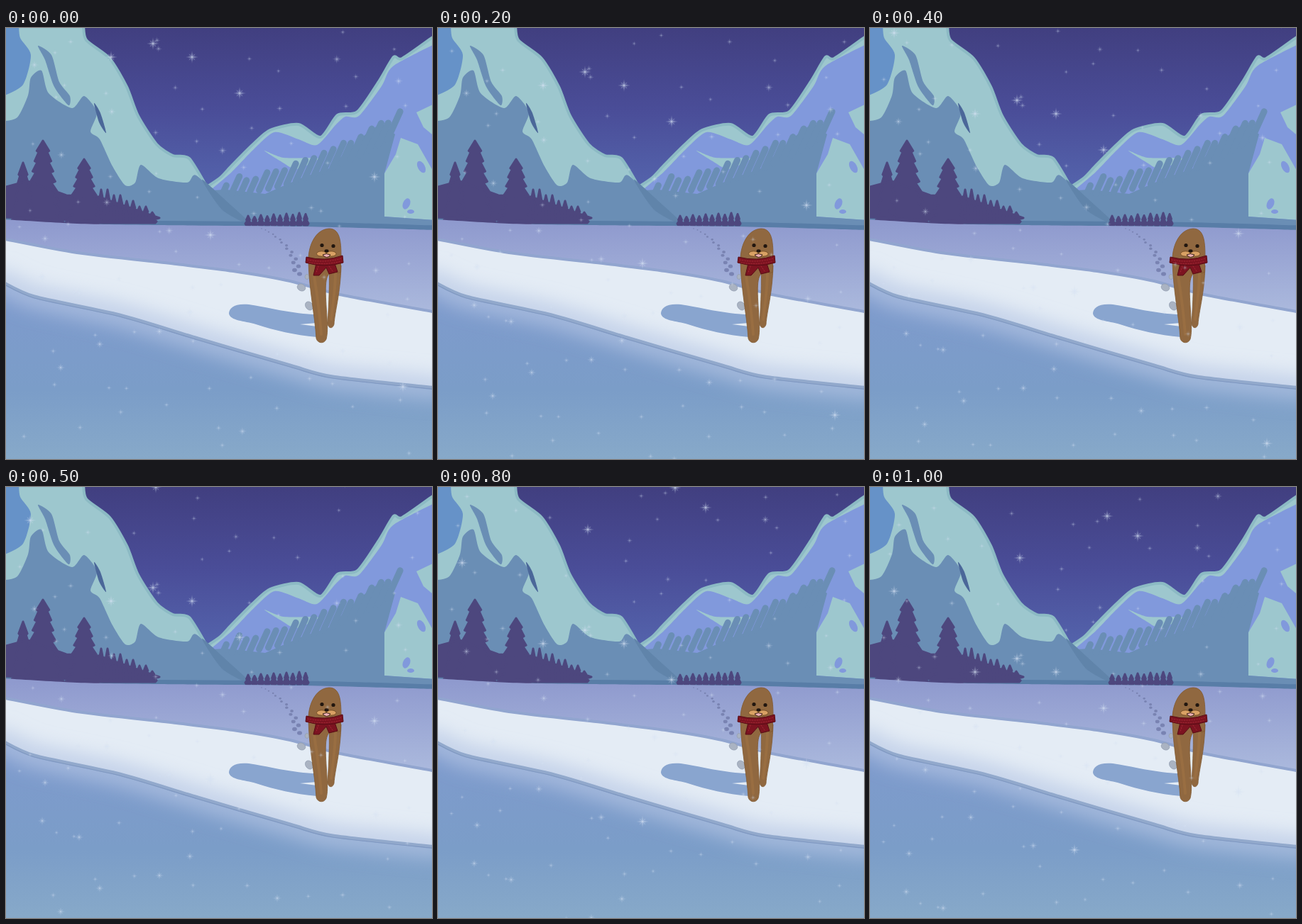
Write an HTML page that moves like this. It is 600 px wide and 608 px high and loops after 1100 ms.

```html
<!DOCTYPE html>
<html lang="en">
<head>
<meta charset="utf-8">
<title>Snowy valley</title>
<style>
html, body { margin: 0; width: 100%; height: 100%; overflow: hidden; background: #7e9fca; }
svg { display: block; width: 600px; height: 608px; }
.teal { fill: #9dc7ce; }
.ridge { stroke: #8cbac4; stroke-width: 4; }
.peri { fill: #8199dc; }
.shade { fill: #6a8eb5; }
.line { fill: none; stroke-linecap: round; stroke-linejoin: round; }
.tree { fill: #4d477e; stroke: #4d477e; stroke-width: 3; stroke-linejoin: round; }
.fur { fill: #906840; stroke: #80592f; stroke-width: .8; }
.scarf { fill: #7c1320; stroke: #570c16; stroke-width: 1; }
#snow { animation: fall 1100ms infinite; }
/* 20px per step, with one double step at 500 ms */
@keyframes fall {
  0% { transform: translateY(0); animation-timing-function: steps(5); }
  45.44% { transform: translateY(100px); animation-timing-function: step-start; }
  45.45% { transform: translateY(120px); animation-timing-function: steps(6); }
  100% { transform: translateY(240px); }
}
</style>
</head>
<body>
<svg viewBox="0 0 600 608">
  <defs>
    <linearGradient id="sky" x2="0" y2="1">
      <stop stop-color="#413f80"/><stop offset=".4" stop-color="#4a4d98"/><stop offset=".85" stop-color="#5668b0"/>
    </linearGradient>
    <linearGradient id="plain" gradientUnits="userSpaceOnUse" x1="0" y1="275" x2="0" y2="400">
      <stop stop-color="#8f9ace"/><stop offset="1" stop-color="#abb9dd"/>
    </linearGradient>
    <linearGradient id="front" gradientUnits="userSpaceOnUse" x1="0" y1="365" x2="0" y2="608">
      <stop stop-color="#7e9acd"/><stop offset=".6" stop-color="#7b9dc8"/><stop offset="1" stop-color="#87a9c9"/>
    </linearGradient>
    <filter id="blur" x="-20%" y="-50%" width="140%" height="200%"><feGaussianBlur stdDeviation="13"/></filter>
    <radialGradient id="glow">
      <stop stop-color="#e4ecf8" stop-opacity=".6"/><stop offset=".35" stop-color="#d2dff2" stop-opacity=".2"/>
      <stop offset="1" stop-color="#d2dff2" stop-opacity="0"/>
    </radialGradient>
    <g id="star">
      <circle r="6" fill="url(#glow)"/>
      <path fill="#d5e0f2" fill-opacity=".55" d="M0-9 .7-.7 9 0 .7 .7 0 9-.7 .7-9 0-.7-.7Z"/>
      <path class="line" stroke="#d5e0f2" stroke-opacity=".4" stroke-width=".7" d="M-4-4 4 4M4-4-4 4"/>
    </g>
  </defs>

  <rect width="600" height="290" fill="url(#sky)"/>

  <!-- right mountains -->
  <path class="teal ridge" data-end="V290H283Z" data-pts="283,224 302,211 319,193 348,164 372,144 412,136 443,154 467,123 495,118 526,74 546,41 558,43 605,10"/>
  <path class="peri" data-end="V290H290Z" data-pts="290,227 318,203 349,171 378,147 412,157 438,165 464,137 478,125 497,124 529,82 545,54 605,22"/>
  <path class="teal" data-pts="364,173 391,183 440,184 409,199 387,188"/>
  <path class="teal" d="M605 106 578 119 588 140 605 154ZM533 205 549 178 556 155 580 164 605 208V271L533 266Z"/>
  <g class="peri">
    <ellipse cx="585" cy="196" rx="5" ry="9" transform="rotate(-28 585 196)"/>
    <ellipse cx="564" cy="248" rx="5" ry="8" transform="rotate(22 564 248)"/>
    <ellipse cx="570" cy="259" rx="5" ry="3"/>
  </g>
  <path class="shade" d="M270 230 310 228 365 234 415 212 455 198 500 155 528 134 548 150 533 205V266L605 271V290H270Z"/>
  <g id="brush" class="line" stroke="#6a8eb5" stroke-width="9"></g>

  <!-- left mountain -->
  <path class="teal ridge" data-end="V290H-6V-6Z" data-pts="109,-6 113,17 146,43 170,83 186,124 212,164 235,180 258,184 285,228"/>
  <path fill="#6692c8" data-end="H-6V-6Z" data-pts="18,-6 20,14 35,38 24,80 -6,97"/>
  <path class="shade" data-end="V290H-6Z" data-pts="-6,132 16,126 31,95 35,70 50,60 60,92 93,113 110,96 128,119 119,146 132,157 150,195 168,222 182,218 190,193 215,212 255,218 268,208 310,250 342,278"/>
  <path class="shade" data-pts="45,25 64,38 75,76 90,96 88,109 68,83 55,45"/>
  <path fill="#4b6799" data-pts="124,106 133,120 141,148 131,133"/>
  <path fill="#6084aa" data-pts="276,214 306,240 346,278 305,257"/>
  <path class="line" stroke="#587da7" stroke-width="7" data-end="" data-pts="-5,269 150,275 420,277 605,282"/>

  <path id="firs" class="tree"/>

  <!-- snowfield -->
  <path fill="url(#plain)" data-end="V420H-6Z" data-pts="-6,270 100,276 215,278 420,280 606,285"/>
  <path fill="#e4ecf5" stroke="#91a5cf" stroke-width="4" data-end="V620H-6Z" data-pts="-6,297 100,317 240,333 320,343 400,357 470,376 606,401"/>
  <path data-rim="V620H-6Z" fill="url(#front)"/>
  <path class="line" data-rim="" stroke="#b6c7e4" stroke-opacity=".7" stroke-width="34" filter="url(#blur)"/>
  <path class="line" data-rim="" stroke="#92a9cc" stroke-width="5"/>
  <path class="line" data-rim="" stroke="#7f98c2" stroke-width="1.2" transform="translate(0 2)"/>

  <path fill="#89a5cf" d="M438 404C405 404 365 393 342 390C322 388 314 395 314 403C316 413 335 413 352 418C380 427 405 433 438 436V421L414 418 438 416Z"/>
  <g id="prints" fill="#7983b2"></g>
  <g fill="#aab3c2" stroke="#929db0" stroke-width=".7">
    <ellipse cx="416" cy="366" rx="6" ry="4.8" transform="rotate(25 416 366)"/>
    <ellipse cx="427" cy="392" rx="5" ry="6.5" transform="rotate(-35 427 392)"/>
    <ellipse cx="424" cy="351" rx="3" ry="3.5"/>
  </g>

  <!-- seal -->
  <path class="fur" d="M455 335C456 360 455 385 453 417C454 424 460 425 462 418C463 400 471 375 472 335Z"/>
  <path class="fur" d="M426 330C425 309 435 284 455 283C470 283 472 300 472 322L471 345 456 346C448 352 450 375 452 408C453 422 453 431 451 439C448 446 439 445 437 438C435 405 427 370 426 330Z"/>
  <path class="line" stroke="#a87946" stroke-width="4" stroke-opacity=".35" d="M434 350C438 375 442 405 444 432M464 345C464 370 460 392 458 411"/>
  <g fill="#d9a164" stroke="#70481f" stroke-width=".8">
    <ellipse cx="444.500" cy="318.500" rx="7" ry="3.600"/>
    <ellipse cx="458" cy="318.500" rx="7" ry="3.600"/>
  </g>
  <path fill="#eeb0b4" stroke="#3a2015" d="M446 320Q451 317 457 320Q452 327 446 320Z"/>
  <g fill="#21160f">
    <circle cx="445" cy="306.500" r="2.600"/><circle cx="461" cy="307.500" r="2.600"/>
    <ellipse cx="451.500" cy="314.500" rx="3" ry="2.200"/>
  </g>
  <path class="scarf" d="M437 332 433 349 441 349 451 338 455 347 467 344 463 332Z"/>
  <path class="scarf" d="M423 323Q449 330 474 321L475 331Q449 339 422 331Z"/>
  <path class="line" stroke="#a32835" stroke-dasharray="1.500 2" d="M425 327Q448 332 473 325M427 331Q449 335 472 329M440 336 437 345M455 336 460 343"/>

  <g id="snow"></g>
</svg>
<script>
const $ = s => document.querySelectorAll(s);
const parse = s => s.split(' ').map(p => p.split(',').map(Number));

// Catmull-Rom spline through the points, closed softly unless an ending is given
function spline(pts, end) {
  const n = pts.length, open = end !== undefined;
  const at = i => open ? pts[Math.max(0, Math.min(n - 1, i))] : pts[(i + n) % n];
  let d = 'M' + pts[0];
  for (let i = 0; i < n - open; i++) {
    const [a, b, c, e] = [at(i - 1), at(i), at(i + 1), at(i + 2)];
    const p = [0, 1].map(k => b[k] + (c[k] - a[k]) / 8);
    const q = [0, 1].map(k => c[k] - (e[k] - b[k]) / 8);
    d += `C${p} ${q} ${c}`;
  }
  return d + (open ? end : 'Z');
}
$('[data-pts]').forEach(e => e.setAttribute('d', spline(parse(e.dataset.pts), e.dataset.end)));

const rim = parse('-6,358 40,379 160,405 270,438 400,476 460,492 606,508');
$('[data-rim]').forEach(e => e.setAttribute('d', spline(rim, e.dataset.rim)));

function add(parent, name, attrs) {
  const e = document.createElementNS('http://www.w3.org/2000/svg', name);
  for (const k in attrs) e.setAttribute(k, attrs[k]);
  document.getElementById(parent).append(e);
}

let seed = 7;
const rand = () => (seed = seed * 16807 % 2147483647) / 2147483647;

// ragged brush strokes along the shaded slope
for (let i = 0; i < 19; i++) {
  const t = i / 18, x = 305 + 232 * t, y = 234 - 76 * t ** 1.8;
  const len = 12 + 20 * t + 12 * rand();
  add('brush', 'path', { d: `M${x} ${y}l${len * .45} ${-len}` });
}

// a fir is a zigzag that widens towards its base
function fir(x, top, half, tiers, base = 274) {
  const step = (base - top) / tiers;
  let left = '', right = '';
  for (let i = 1; i <= tiers; i++) {
    const y = top + i * step, w = half * (.2 + .8 * i / tiers);
    right += `L${x + w} ${y}L${x + w * .7} ${y + 2}`;
    left = `L${x - w * .7} ${y + 2}L${x - w} ${y}` + left;
  }
  return `M${x} ${top}${right}${left}Z`;
}
let woods = fir(24, 190, 17, 5) + fir(52, 159, 29, 8) + fir(110, 185, 26, 7) + 'M0 224 30 216 85 236 130 238 216 268 190 275 0 267Z';
for (let i = 0; i < 9; i++) woods += fir(134 + i * 9, 228 + i * 4 - i % 2 * 4, 6, 3, 273);
for (let i = 0; i < 10; i++) woods += fir(341 + i * 9, 265 - i * .5 + i % 2 * 2, 4, 2, 276);
document.getElementById('firs').setAttribute('d', woods);

// footprints shrink towards the horizon
for (let i = 0; i < 16; i++) {
  const t = i / 15, side = (i % 2 ? 3.5 : -3.5) * t;
  const r = .8 + 2.7 * t;
  add('prints', 'ellipse', { cx: 360 + 50 * Math.sin(t * Math.PI / 2) + side, cy: 283 + 64 * t ** 1.3, rx: r, ry: r * .8 });
}

// positions at time zero; those above the stage fall into view
const star = (x, y, size, opacity) =>
  add('snow', 'use', { href: '#star', transform: `translate(${x} ${y}) scale(${size})`, opacity });

parse('148,41 329,92 519,210 288,292 559,506 334,-179 377,-151 211,-120 34,-73 207,22 262,41')
  .forEach(([x, y]) => star(x, y, 1, .9));
parse('466,44 305,173 553,75 149,118 40,52 78,179 142,246 55,297 51,351 103,374 132,446 382,460 77,479 333,569 230,286 521,342 216,428 259,401 461,-134 490,-207')
  .forEach(([x, y]) => star(x, y, .75, .75));

// one faint star in each cell of a loose grid
for (let y = -220; y < 590; y += 62)
  for (let x = 10; x < 580; x += 72)
    star(x + 66 * rand(), y + 58 * rand(), .45 + .15 * rand(), .6);
</script>
</body>
</html>
```
